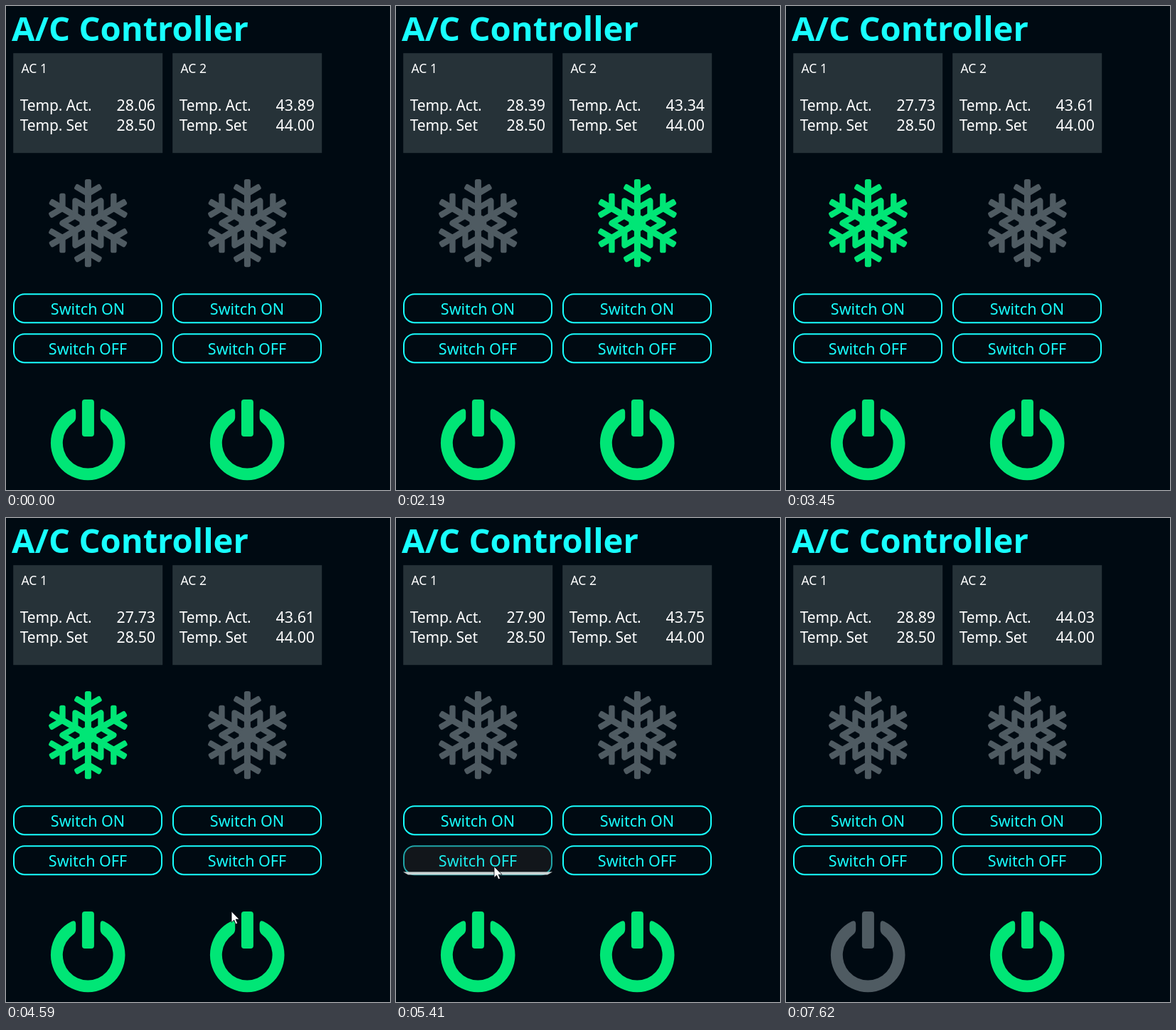
Animation, 540 px wide and 679 px high, one loop 8 s. Source, as an HTML page:

```html
<!DOCTYPE html>
<html lang="en">
<head>
<meta charset="utf-8">
<title>A/C Controller</title>
<style>
  html, body { margin: 0; width: 100%; height: 100%; overflow: hidden; background: #000a12; }
  svg { display: block; width: 100%; height: 100%; font-family: "Noto Sans", "Open Sans", sans-serif; }
  .title { font-size: 47.2px; font-weight: 700; fill: #18ffff; }
  .panel { fill: #263238; }
  .name { font-size: 17.5px; fill: #fff; }
  .label { font-size: 21px; letter-spacing: -.15px; fill: #fff; }
  .value { font-size: 21.3px; text-anchor: end; fill: #fff; }
  .btn rect { fill: #000a12; stroke: #18ffff; stroke-width: 2; }
  .btn text { font-size: 21.5px; text-anchor: middle; fill: #18ffff; }
  .btn.hover rect { fill: #12161b; stroke: #1fa5a8; }
  .btn.hover text { fill: #1ceeee; }
</style>
</head>
<body>
<svg id="stage" viewBox="0 0 540 679"></svg>
<script>
const LOOP = 8000, COLUMN = 224;
const GREEN = '#00e676', GRAY = '#4f5b62';
const POWER_OFF = 6090;
const TICKS = [390, 1460, 2450, 3450, 5000, 6090, 6890];
const UNITS = [
  { n: 1, start: 28.062, set: 28.5, step: .166, offAt: POWER_OFF },
  { n: 2, start: 43.8875, set: 44, step: .1375, offAt: Infinity }
];

const stage = document.getElementById('stage');
const el = id => document.getElementById(id);
const repeat = (count, fn) => Array.from({ length: count }, (_, i) => fn(i)).join(' ');

function polar(r, deg) {
  const a = deg * Math.PI / 180;
  return [r * Math.cos(a), r * Math.sin(a)].map(v => v.toFixed(2)).join();
}

const bar = (w, h, move = '') =>
  `<rect x="${-w / 2}" y="${-h}" width="${w}" height="${h}" rx="2.7" transform="${move}"/>`;

function flake() {
  const arm = bar(9, 61.7) + [-60, 60].map(a => bar(8.4, 21, `translate(0 -41.5) rotate(${a})`)).join('');
  const arms = repeat(6, i => `<g transform="rotate(${i * 60})">${arm}</g>`);
  const star = repeat(12, i => polar(i % 2 ? 20.8 : 36, i * 30));
  return `${arms}<circle r="12"/>
    <polygon points="${star}" fill="none" stroke="currentColor" stroke-width="8.2" stroke-linejoin="round"/>`;
}

const power = `<rect x="-8.3" y="-61" width="17" height="52" rx="4"/>
  <path d="M-17-43Q-17-49.5-23-47A52.3 52.3 0 1 0 23-47Q17.4-49.5 17.4-43V-36Q17.4-31 20.8-28.6A35.4 35.4 0 1 1-20.8-28.6Q-17-31-17-36Z"/>`;

const button = (id, y, label) => `<g class="btn" id="${id}">
  <rect x="11" y="${y}" width="208" height="40" rx="15"/>
  <text x="115" y="${y + 29}">${label}</text></g>`;

const unit = ({ n, set }) => `<g transform="translate(${(n - 1) * COLUMN} 0)">
  <rect class="panel" x="10.2" y="66.2" width="210" height="140"/>
  <text class="name" x="21.5" y="94">AC ${n}</text>
  <text class="label" x="19.7" y="147">Temp. Act.</text>
  <text class="value" x="210" y="147" id="act${n}"></text>
  <text class="label" x="19.7" y="175">Temp. Set</text>
  <text class="value" x="210" y="175">${set.toFixed(2)}</text>
  <g id="flake${n}" fill="currentColor" transform="translate(115.4 304.6)">${flake()}</g>
  ${button('on' + n, 404.2, 'Switch ON')}
  ${button('off' + n, 460.2, 'Switch OFF')}
  <g id="power${n}" transform="translate(115.2 613)">${power}</g>
</g>`;

stage.innerHTML = `
  <text class="title" x="8" y="49">A/C Controller</text>
  ${UNITS.map(unit).join('')}
  <path id="press" d="M10 496.5H220L213 500.5H17Z" fill="#cbd5d5"/>
  <path id="cursor" d="M0 0V15.5L3.6 12.2L6 17.8L8.5 16.7L6.1 11.2H11Z" fill="#fff" stroke="#000a12" stroke-width=".8"/>`;

// Each tick warms by one step; above the set point it cools by five,
// and with the power off it warms by five.
function reading({ start, set, step, offAt }, t) {
  let temp = start, cooling = false;
  for (const tick of TICKS) {
    if (tick > t) break;
    cooling = temp > set && tick < offAt;
    temp += step * (cooling ? -5 : tick > offAt ? 5 : 1);
  }
  return { temp, cooling };
}

const within = (t, from, to) => t >= from && t < to;
const progress = (t, from, to) => Math.min(1, Math.max(0, (t - from) / (to - from)));
const show = (id, on) => el(id).setAttribute('visibility', on ? 'visible' : 'hidden');

// The pointer glides in to the button, rests, then leaves to the right.
function pointer(t) {
  const enter = progress(t, 4450, 5140), leave = progress(t, 5430, 5690);
  const x = 138 + 386 * (1 - enter) ** 3.36 + 420 * leave;
  const y = 489 + 79 * (1 - enter) - 24 * leave;
  return `translate(${x} ${y})`;
}

function draw(t) {
  for (const u of UNITS) {
    const { temp, cooling } = reading(u, t);
    el('act' + u.n).textContent = temp.toFixed(2);
    el('flake' + u.n).style.color = cooling ? GREEN : GRAY;
    el('power' + u.n).setAttribute('fill', t < u.offAt ? GREEN : GRAY);
  }
  el('off1').classList.toggle('hover', within(t, 5000, 5480));
  show('press', within(t, 5340, 5480));
  show('cursor', within(t, 4450, 5690));
  el('cursor').setAttribute('transform', pointer(t));
}

const start = performance.now();
function frame() {
  draw((performance.now() - start) % LOOP);
  requestAnimationFrame(frame);
}
frame();
</script>
</body>
</html>
```
